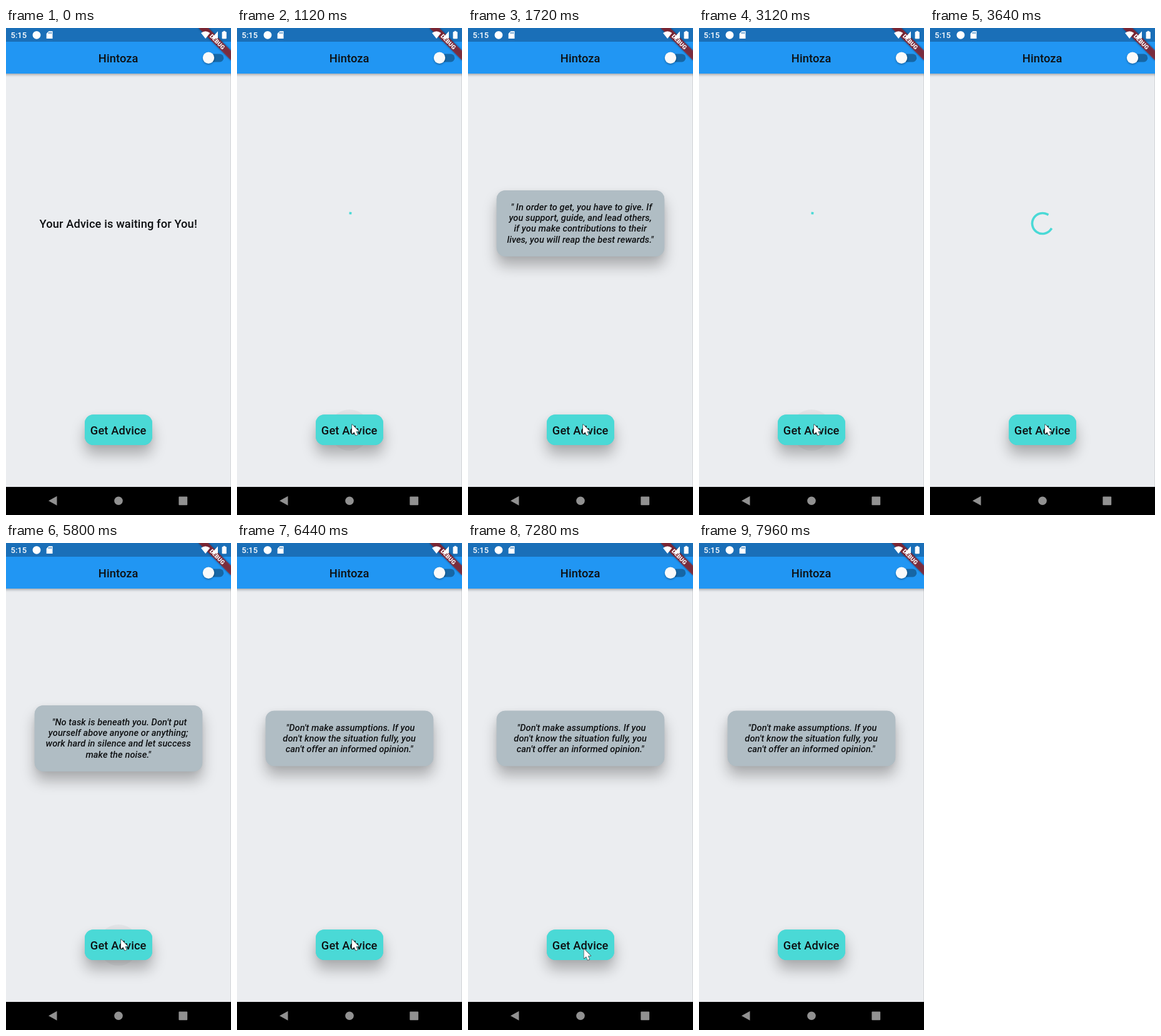
Recreate the animation shown at these times as an HTML page with a canvas. Size 360 px wide and 780 px high, loop 8 s.

```html
<!DOCTYPE html>
<html lang="en">
<head>
<meta charset="utf-8">
<style>
html, body { margin: 0; width: 100%; height: 100%; overflow: hidden; background: #ebedf0; }
canvas { display: block; width: 360px; height: 780px; }
</style>
</head>
<body>
<canvas id="stage"></canvas>
<script>
const W = 360, H = 780, LOOP = 8000;
const DP = W / 393; // stage pixels per layout unit
const TEAL = '#4ad9d6', INK = '#0e1012';
const MID = 179.7; // optical centre of the text
const canvas = document.getElementById('stage');
const ctx = canvas.getContext('2d');
const ratio = window.devicePixelRatio || 1;
canvas.width = W * ratio;
canvas.height = H * ratio;

const quotes = [
  ['" In order to get, you have to give. If', 'you support, guide, and lead others,',
   'if you make contributions to their', 'lives, you will reap the best rewards."'],
  ['"No task is beneath you. Don\'t put', 'yourself above anyone or anything;',
   'work hard in silence and let success', 'make the noise."'],
  ['"Don\'t make assumptions. If you', 'don\'t know the situation fully, you',
   'can\'t offer an informed opinion."']
];
const taps = [1040, 3040, 5760];
const LOAD_START = 60, LOAD_END = 640;
const ENTER = 640, LEAVE = 7180, GONE = 7460;

const clamp = x => Math.min(1, Math.max(0, x));
const mix = (a, b, p) => a + (b - a) * p;
const easeOut = p => 1 - (1 - p) ** 3;

// Cubic bezier timing with control points (.4, 0) and (.2, 1)
function fastOutSlowIn(x) {
  let lo = 0, hi = 1;
  for (let i = 0; i < 20; i++) {
    const s = (lo + hi) / 2;
    const bx = 1.2 * s * (1 - s) ** 2 + 0.6 * s * s * (1 - s) + s ** 3;
    if (bx < x) lo = s; else hi = s;
  }
  return 3 * lo * lo - 2 * lo ** 3;
}

function rect(x, y, w, h, color) {
  ctx.fillStyle = color;
  ctx.fillRect(x, y, w, h);
}

function rounded(x, y, w, h, r, color) {
  ctx.fillStyle = color;
  ctx.beginPath();
  ctx.roundRect(x, y, w, h, r);
  ctx.fill();
}

function disc(x, y, r, color) {
  ctx.fillStyle = color;
  ctx.beginPath();
  ctx.arc(x, y, r, 0, Math.PI * 2);
  ctx.fill();
}

function poly(color, ...pts) {
  ctx.fillStyle = color;
  ctx.beginPath();
  pts.forEach(([x, y]) => ctx.lineTo(x, y));
  ctx.closePath();
  ctx.fill();
}

function shadow(alpha, blur, dy) {
  ctx.shadowColor = `rgba(0,0,0,${alpha})`;
  ctx.shadowBlur = blur * ratio;
  ctx.shadowOffsetY = dy * ratio;
}

function text(str, x, y, size, { style = '500', color = INK, align = 'center', spacing = 0 } = {}) {
  ctx.font = `${style} ${size}px Roboto, sans-serif`;
  ctx.letterSpacing = spacing + 'px';
  ctx.textAlign = align;
  ctx.fillStyle = color;
  ctx.fillText(str, x, y);
}

const heading = (str, y) => text(str, MID, y, 20 * DP, { spacing: 0.1 });

function raised(x, y, w, h, color) {
  ctx.save();
  shadow(0.27, 22, 15);
  rounded(x, y, w, h, 15 * DP, color);
  shadow(0.05, 8, 1);
  rounded(x, y, w, h, 15 * DP, color);
  ctx.restore();
}

function appBar() {
  ctx.save();
  shadow(0.3, 4, 1.5);
  rect(-10, 0, W + 20, 73, '#2196f3');
  ctx.restore();
  rect(0, 0, W, 22, '#1a6fb8');
  heading('Hintoza', 54.5);
  rounded(318, 41.5, 30.3, 12.9, 6.4, '#1666a5');
  ctx.save();
  shadow(0.3, 3, 1.5);
  disc(324, 47.8, 9.2, '#fafafa');
  ctx.restore();
}

function ribbon() {
  ctx.save();
  ctx.translate(W, 0);
  ctx.rotate(Math.PI / 4);
  const box = [-40 * DP, 28 * DP, 80 * DP, 12 * DP];
  ctx.filter = `blur(${1.8 * ratio}px)`;
  rect(...box, 'rgba(0,0,0,.5)');
  ctx.filter = 'none';
  rect(...box, 'rgba(183,28,28,.63)');
  text('DEBUG', 0, 34.4, 10.2 * DP, { style: '900', color: '#fff' });
  ctx.restore();
}

function statusIcons() {
  text('5:15', 7.5, 16, 13, { color: '#fff', align: 'left' });
  disc(49, 11.3, 6.4, '#fff');
  poly('#fff', [68.5, 5], [74.5, 5], [74.5, 17], [64.7, 17], [64.7, 9]);
  for (let i = 0; i < 3; i++) rect(68 + i * 2, 6.6, 1, 2.6, '#1a6fb8');
  // Wi-Fi fan
  ctx.fillStyle = '#fff';
  ctx.beginPath();
  ctx.moveTo(319.2, 17);
  ctx.lineTo(312, 8);
  ctx.quadraticCurveTo(319.2, 2.6, 326.4, 8);
  ctx.fill();
  poly('#fff', [339, 5.3], [339, 16.8], [328.5, 16.8]);
  rounded(345.6, 6, 7.2, 11.2, 1, '#fff');
  rect(347.6, 4.8, 3.2, 2, '#fff');
}

function navBar() {
  rect(0, 735, W, H - 735, '#000');
  const grey = '#919191';
  poly(grey, [68, 757.3], [81.5, 749.8], [81.5, 764.8]);
  disc(180, 757.3, 6.8, grey);
  rounded(276.4, 750.4, 13.8, 13.8, 1, grey);
}

function ripple(age) {
  const a = 0.04 * clamp(age / 40) * (1 - clamp((age - 160) / 200));
  if (age >= 0 && a > 0) disc(180, 644, 33, `rgba(0,0,0,${a})`);
}

function spinner(age) {
  const phase = (age / 1333) % 1;
  const head = fastOutSlowIn(clamp(phase * 2));
  const tail = fastOutSlowIn(clamp(phase * 2 - 1));
  const turn = Math.PI * 1.5;
  const start = -Math.PI / 2 + tail * turn + (age / 2222) * Math.PI * 2 + phase * Math.PI / 2;
  ctx.strokeStyle = TEAL;
  ctx.lineWidth = 4 * DP;
  ctx.lineCap = 'square';
  ctx.beginPath();
  ctx.arc(180, 313, 18 * DP, start, start + Math.max((head - tail) * turn, 0.001));
  ctx.stroke();
}

function card(lines) {
  const step = 17.25;
  const h = lines.length * step + 40 * DP;
  const top = 313 - h / 2;
  raised(50 * DP, top, W - 100 * DP, h, '#b0bdc4');
  lines.forEach((line, i) => {
    const x = i ? MID : MID + 1.8; // the first line opens with a space
    text(line, x, top + 20 * DP + 13.4 + i * step, 16 * DP, { style: 'italic 500', spacing: 0.07 });
  });
}

function content(t) {
  const n = taps.filter(tap => t >= tap + LOAD_START).length;
  if (!n) return heading('Your Advice is waiting for You!', 319.7);
  const age = t - taps[n - 1];
  if (age < LOAD_END) spinner(age - LOAD_START);
  else card(quotes[n - 1]);
}

function pointer(t) {
  if (t < ENTER || t >= GONE) return;
  const arrive = easeOut(clamp((t - ENTER + 40) / 280));
  const leave = clamp((t - LEAVE) / (GONE - LEAVE)) ** 2;
  ctx.save();
  ctx.translate(mix(345, 184, arrive) + leave * 12, mix(600, 635, arrive) + leave * 118);
  const arrow = new Path2D('M0 0V15L3.5 11.9L6 17.6L8.8 16.4L6.4 10.9H10.9Z');
  ctx.lineJoin = 'round';
  ctx.lineWidth = 1.4;
  ctx.strokeStyle = '#3c4446';
  ctx.stroke(arrow);
  ctx.fillStyle = '#fff';
  ctx.fill(arrow);
  ctx.restore();
}

function draw(t) {
  ctx.setTransform(ratio, 0, 0, ratio, 0, 0);
  rect(0, 0, W, H, '#ebedf0');
  rect(359, 73, 1, 663, '#d3d5d8');
  taps.forEach(tap => ripple(t - tap));
  content(t);
  raised(126, 619.3, 108, 48.8, TEAL);
  heading('Get Advice', 650.5);
  appBar();
  ribbon();
  statusIcons();
  navBar();
  pointer(t);
}

const origin = performance.now();
function tick() {
  draw((performance.now() - origin) % LOOP);
  requestAnimationFrame(tick);
}
tick();
</script>
</body>
</html>
```
